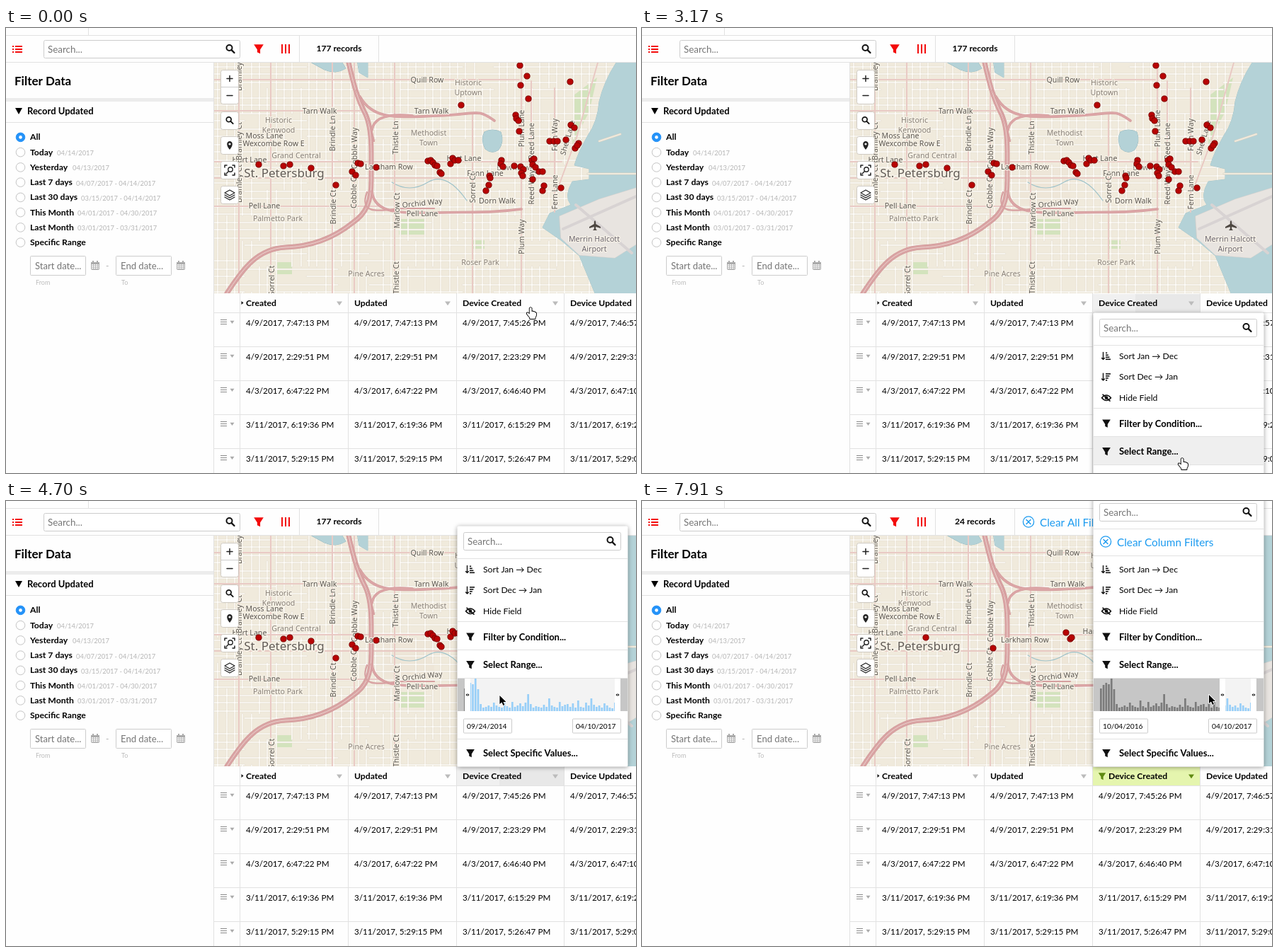
An HTML page with a canvas that plays this animation: 890 px wide and 629 px high, repeating every 8 s.

```html
<!DOCTYPE html>
<html lang="en">
<head>
<meta charset="utf-8">
<title>Filter by range</title>
<style>
html, body { margin: 0; width: 100%; height: 100%; overflow: hidden; background: #fff; }
canvas { display: block; }
</style>
</head>
<body>
<canvas id="stage" width="890" height="629"></canvas>
<script>
const stage = document.getElementById('stage').getContext('2d');
let g = stage;

// ---------- helpers ----------
const UI = 'Lato, sans-serif', MAP = '"Noto Sans", sans-serif';
const BLUE = '#1c9bf0', RED = '#f30b0b', LINE = '#e2e2e2';

function text(s, x, y, size = 11.7, color = '#000', weight = 400, family = UI, align = 'left') {
  g.font = `${weight} ${size}px ${family}`;
  g.fillStyle = color;
  g.textAlign = align;
  g.fillText(s, x, Math.round(y + size * .36));
}
const bold = (s, x, y, size = 12.2, color = '#000') => text(s, x, y, size, color, 700);
function rect(x, y, w, h, color) { g.fillStyle = color; g.fillRect(x, y, w, h); }
function box(x, y, w, h, r, fill, stroke) {
  g.beginPath();
  g.roundRect(x + .5, y + .5, w, h, r);
  g.fillStyle = fill; g.fill();
  if (stroke) { g.lineWidth = 1; g.strokeStyle = stroke; g.stroke(); }
}
function shape(d, x, y, fill, stroke, width = 1) {
  const path = new Path2D(d);
  g.save();
  g.translate(x, y);
  g.lineWidth = width;
  g.lineJoin = g.lineCap = 'round';
  if (stroke) { g.strokeStyle = stroke; g.stroke(path); }
  if (fill) { g.fillStyle = fill; g.fill(path); }
  g.restore();
}
function disc(x, y, r, fill, stroke, width = 1) {
  g.beginPath();
  g.arc(x, y, r, 0, 7);
  if (fill) { g.fillStyle = fill; g.fill(); }
  if (stroke) { g.lineWidth = width; g.strokeStyle = stroke; g.stroke(); }
}
function magnifier(x, y, size = 1) {
  disc(x - 1.5 * size, y - 1.5 * size, 4 * size, null, '#111', 2 * size);
  shape(`M${1.6 * size} ${1.6 * size}L${5.5 * size} ${5.5 * size}`, x, y, null, '#111', 2.3 * size);
}
const funnel = (x, y, color, s = 1) =>
  shape(`M${-6.5 * s} ${-6 * s}H${6.5 * s}L${2 * s} ${s}V${6.5 * s}L${-2 * s} ${4.5 * s}V${s}Z`, x, y, color);
const caret = (x, y, color, s = 4) => shape(`M${-s} ${-s * .6}H${s}L0 ${s * .8}Z`, x, y, color);
function clearIcon(x, y) {
  disc(x, y, 7.6, null, BLUE, 1.3);
  shape('M-3 -3L3 3M3 -3L-3 3', x, y, null, BLUE, 1.5);
}
function searchBox(x, y, w, h) {
  box(x, y, w, h, 2, '#fff', '#ccc');
  text('Search...', x + 6, y + h / 2 + .5, 13.4, '#757575');
  magnifier(x + w - 13, y + h / 2);
}

// ---------- map ----------
function road(d, width, color = '#dca5a6', casing = '#d09a9a') {
  shape(d, 0, 0, null, casing, width + 1);
  shape(d, 0, 0, null, color, width);
}
function label(s, x, y, angle = 0, color = '#5b5650', size = 10.6) {
  g.save();
  g.translate(x, y);
  g.rotate(angle * Math.PI / 180);
  g.font = `400 ${size}px ${MAP}`;
  g.textAlign = 'center';
  g.lineJoin = 'round';
  g.lineWidth = size > 15 ? 4 : 2.5;
  g.strokeStyle = '#f6f1e6';
  g.strokeText(s, 0, Math.round(size * .36));
  text(s, 0, 0, size, color, 400, MAP, 'center');
  g.restore();
}
function drawMap() {
  let seed = 11;
  const random = () => (seed = seed * 16807 % 2147483647) / 2147483647;
  rect(293, 49, 597, 326, '#f0eadc');

  // parks and pale districts
  rect(535, 195, 70, 55, '#eee6d8');
  shape('M383 331H404V348H383ZM555 270H592V292H555ZM660 300H676V312H660ZM802 95L835 70L824 118L800 165Z', 0, 0, '#d3e3bd');

  // small streets
  let streets = '';
  for (let x = 299, n = 0; x < 850; x += n++ % 3 ? 11 : 13)
    for (let y = 49; y < 375; y += 36)
      if (random() < .82) streets += `M${x} ${y}V${y + 36}`;
  for (let y = 55, n = 0; y < 375; y += n++ % 2 ? 12 : 10)
    for (let x = 293; x < 840; x += 44)
      if (random() < .85) streets += `M${x} ${y}H${x + 44}`;
  road(streets, 1.5, '#fffefa', '#ddd5c7');

  // bay, lakes and airfield
  const water = '#b4d2d7', shore = '#a3c4ca';
  shape('M890 49H862Q845 75 838 104Q836 132 822 152Q808 176 803 194L824 199V214L800 217Q788 238 798 250L768 262L758 282L784 300L810 322L832 375H890Z', 0, 0, water, shore);
  shape('M676 147Q687 141 699 147Q704 161 696 172Q687 179 677 171Q670 157 676 147ZM432 49H475L480 57Q466 66 450 59Z', 0, 0, water, '#8fb5bd');
  shape('M497 49H511V70L499 63Z', 0, 0, water, shore);
  shape('M782 266L838 242L890 226V306L860 325L810 321L784 297Z', 0, 0, '#e8e4e0', '#d3cecb');
  road('M787 284L890 238M805 250L884 318', 3, '#d8d3d3', '#d8d3d3');
  road('M822 206H890M838 160L868 150', 2, '#f0eadc', '#d5cfc2');
  shape('M545 218Q570 234 596 218T651 244', 0, 0, null, '#9fc3ca', 1.2);

  // main roads
  road('M293 73H725M293 117H500M293 189H785M293 212H780M293 252H530M329 49V375M374 49V375M461 49V375M492 49V375M549 49V375M659 120V375M728 49V375M742 75V250M775 85V260M836 49L806 155L782 220', 1, '#e9c5c1', '#e9cfc8');
  const motorway = 'M484 49C490 75 496 100 508 122Q516 140 516 175V215C516 246 509 262 490 275C458 301 425 309 395 310C355 312 335 340 312 375';
  road(motorway, 6, '#d9a3a3');
  shape(motorway, 0, 0, null, '#ecd3cf', 1);
  road('M500 97C519 131 553 126 610 124S665 113 690 131M517 144C520 124 545 121 574 124M517 231C520 263 557 262 610 261S690 261 728 256', 2.6);
  road('M510 232C496 270 540 255 565 255H605M495 88Q510 115 520 160', 1.2);

  // labels
  const soft = '#888078';
  for (const [s, x, y] of [['Historic', 385, 130], ['Kenwood', 385, 144], ['Historic', 653, 77], ['Uptown', 653, 91],
    ['Methodist', 597, 148], ['Town', 597, 162], ['Grand Central', 410, 180], ['Palmetto Park', 384, 269],
    ['Pine Acres', 509, 347], ['Roser Park', 670, 331], ['Downtown', 720, 197]]) label(s, x, y, 0, soft);
  for (const [s, x, y, a] of [['Quill Row', 595, 73], ['Tarn Walk', 443, 117], ['Tarn Walk', 601, 117],
    ['Moss Lane', 365, 152], ['Wexcombe Row E', 378, 163], ['Larkham Row', 541, 196], ['Hart Lane', 344, 186],
    ['Hart Lane', 647, 184], ['Fenn Lane', 677, 205], ['Dorn Walk', 694, 244], ['Pell Lane', 365, 251],
    ['Pell Lane', 588, 262], ['Orchid Way', 588, 247, -6], ['Brindle Ln', 461, 149, -90],
    ['Cobble Way', 492, 170, -90], ['Thistle Ln', 550, 155, -90], ['Brindle Ct', 462, 253, -90],
    ['Cobble Ct', 491, 231, -90], ['Marlow Ct', 552, 258, -90], ['Thistle Ct', 551, 353, -90],
    ['Sorrel Ct', 375, 357, -90], ['Sorrel Ct', 659, 226, -90], ['Plum Lane', 728, 142, -90],
    ['Reed Lane', 742, 160, -90], ['Reed Way', 742, 225, -90], ['Plum Way', 728, 295, -90],
    ['Fern Way', 775, 151, -90], ['Fern Lane', 775, 232, -90], ['Shell Lane', 793, 155, -74],
    ['Bramley Ct', 329, 62, -90], ['Bramley Ct', 329, 160, -90], ['Bramley Ct', 329, 220, -90]]) label(s, x, y, a);
  label('St. Petersburg', 393, 205, 0, '#625c57', 17);
  label('Merrin Halcott', 831, 298, 0, '#6b6570');
  label('Airport', 831, 312, 0, '#6b6570');
  shape('M0 -7Q1.5 -6 1.2 -2L8 2V4L1.2 2V5L3 7H-3L-1.2 5V2L-8 4V2L-1.2 -2Q-1.5 -6 0 -7Z', 832, 279, '#4d4741');
}

const dots = [357,193, 392,195, 401,193, 431,198, 466,222, 489,203, 494,208, 497,191, 501,192, 523,197,
  596,188, 600,187, 603,190, 606,194, 609,195, 613,204, 615,206, 628,192, 631,184, 634,187, 639,187, 643,109,
  726,53, 736,68, 727,81, 738,100, 797,76, 720,123, 721,128, 724,131, 725,146, 798,137, 803,141, 768,160,
  774,160, 779,160, 791,158, 804,170, 809,163, 807,166, 700,187, 699,192, 702,196, 683,209, 684,212, 682,222,
  678,230, 718,195, 727,196, 731,200, 728,205, 730,209, 743,187, 746,185, 744,193, 748,197, 753,203, 758,203,
  744,214, 760,223, 758,230, 784,226];
function drawDots(list) {
  for (let i = 0; i < list.length; i += 2) disc(list[i], list[i + 1], 4.1, '#b80404', '#7c0303');
}
function mapControls() {
  for (const [y, h] of [[59, 48], [118, 25], [153, 25], [188, 25], [223, 25]]) box(303, y, 25, h, 3, '#fff', '#cfcac2');
  rect(304, 83, 24, 1, '#ccc');
  shape('M-4 0H4M0 -4V4M-4 24H4', 316, 71.5, null, '#222', 1.5);
  magnifier(316, 130.5, .85);
  shape('M0 6C-6 -1 -4 -6 0 -6S6 -1 0 6Z', 316, 166, '#222');
  disc(316, 164, 1.6, '#fff');
  shape('M-7 -4V-7H-4M4 -7H7V-4M-7 4V7H-4M4 7H7V4M-5 5L-2 2', 316, 201, null, '#222', 1.5);
  disc(317, 200, 3.2, null, '#222', 1.4);
  shape('M-7 -3L0 -7L7 -3L0 1ZM-7 0L0 4L7 0M-7 3L0 7L7 3', 316, 236, null, '#222', 1.2);
}

// ---------- page ----------
function drawPage() {
  rect(0, 0, 890, 629, '#fefefe');
  rect(0, 10, 890, 1, LINE);
  rect(116, 0, 1, 10, LINE);
  rect(0, 48, 890, 1, LINE);
  for (const y of [25, 29, 33]) { rect(9, y, 2, 2, RED); rect(13, y, 10, 2, RED); }
  searchBox(53, 17, 277, 25);
  funnel(357, 29.5, RED, 1.05);
  for (const x of [389, 394, 399]) rect(x, 23, 2, 13, RED);
  rect(414, 11, 1, 37, LINE);
  rect(526, 11, 1, 37, LINE);

  bold('Filter Data', 12, 75, 17);
  rect(0, 99, 293, 5, '#ececec');
  shape('M-5 -4H5L0 5Z', 18, 117, '#000');
  bold('Record Updated', 30, 117, 13);
  rect(0, 133, 293, 1, LINE);
  [['All'], ['Today', '04/14/2017', 72], ['Yesterday', '04/13/2017', 94],
    ['Last 7 days', '04/07/2017 - 04/14/2017', 99], ['Last 30 days', '03/15/2017 - 04/14/2017', 106],
    ['This Month', '04/01/2017 - 04/30/2017', 101], ['Last Month', '03/01/2017 - 03/31/2017', 101], ['Specific Range']]
    .forEach(([name, dates, x], i) => {
      const y = 154.4 + i * 21.25;
      disc(20.5, y, 6.3, i ? '#fff' : '#2492f8', i ? '#c4c4c4' : '#2492f8');
      if (!i) disc(20.5, y, 2.3, '#fff');
      bold(name, 34, y - .4);
      if (dates) text(dates, x, y + 1, 9.4, '#b5b5b5');
    });
  [[34, 'Start date...', 'From'], [155, 'End date...', 'To']].forEach(([x, hint, note]) => {
    box(x, 322, 78, 27, 1, '#fff', '#ccc');
    text(hint, x + 7, 336.5, 13.1, '#757575');
    text(note, x + 8, 360, 9, '#bbb');
    box(x + 86, 331, 11, 10, 1, '#fff', '#aaa');
    rect(x + 86, 331, 12, 3, '#aaa');
    rect(x + 88, 329, 2, 3, '#aaa');
    rect(x + 94, 329, 2, 3, '#aaa');
    for (let i = 1; i < 4; i++) { rect(x + 86 + i * 3, 334, 1, 7, '#bbb'); rect(x + 86, 333 + i * 2.4, 12, 1, '#bbb'); }
  });
  text('-', 141, 336, 12, '#aaa');

  // table
  const columns = [331, 484, 637, 789];
  const left = ['4/9/2017, 7:47:13 PM', '4/9/2017, 2:29:51 PM', '4/3/2017, 6:47:22 PM', '3/11/2017, 6:19:36 PM', '3/11/2017, 5:29:15 PM'];
  const right = [['4/9/2017, 7:45:26 PM', '4/9/2017, 7:46:57 PM'], ['4/9/2017, 2:23:29 PM', '4/9/2017, 2:29:31 PM'],
    ['4/3/2017, 6:46:40 PM', '4/3/2017, 6:47:10 PM'], ['3/11/2017, 6:15:29 PM', '3/11/2017, 6:19:21 PM'],
    ['3/11/2017, 5:26:47 PM', '3/11/2017, 5:29:01 PM']];
  rect(293, 49, 1, 580, LINE);
  for (const x of columns) rect(x - 1, 375, 1, 254, LINE);
  ['Created', 'Updated', '', 'Device Updated'].forEach((s, i) => {
    bold(s, columns[i] + 8, 389);
    if (i < 2) caret(columns[i] + 140, 389, '#bbb');
  });
  shape('M0 -2.5L3 0L0 2.5Z', 332.5, 388.5, '#111');
  left.forEach((created, i) => {
    const y = 416.5 + i * 48;
    rect(294, y - 14.5, 596, 1, LINE);
    for (const dy of [-4.5, -1.5, 1.5]) rect(303, y + dy, 9, 1, '#888');
    caret(319.5, y - 1, '#aaa', 3);
    [created, created, ...right[i]].forEach((s, c) => text(s, columns[c] + 8, y));
  });

  g.save();
  g.beginPath();
  g.rect(294, 49, 596, 326);
  g.clip();
  drawMap();
  g.restore();
}

// ---------- timed parts ----------
const OPEN = 1760, FLIP = 3290, EXPAND = 3530, DRAG = 5400, APPLY = 6790, COUNT = 6970, LEAVE = 7910, STEP = 114;
const bars = [32,37,40,38,46,31,10,5,6,8,6,12,8,6,5,15,7,5,13,6,8,11,7,12,24,10,5,7,6,5,
  9,6,18,8,6,5,13,7,9,10,6,11,5,15,6,5,12,8,18,9,6,8,5,11,8,5,4,12];
// pointer x, left edge of the range, days after the first date
const dragSteps = [[680, 651, 13], [745, 700, 222], [800, 750, 436], [812, 790, 621], [818, 808, 704], [820, 815, 736], [820, 816, 741]];
// start, steps, x, y
const moves = [[470, 1, 742, 397], [620, 2, 775, 384], [2120, 7, 763, 608], [3640, 6, 772, 275], [4350, 7, 649, 275], [5160, 1, 650, 276]];

const dragAt = t => t < DRAG ? [650, 648, 0] : dragSteps[Math.min(6, Math.floor((t - DRAG) / STEP))];

function pointerAt(t) {
  if (t >= LEAVE) return [801, 274];
  if (t >= DRAG) return [dragAt(t)[0], 277];
  let x = 741, y = 395;
  for (const [start, steps, toX, toY] of moves) {
    if (t < start) break;
    const k = Math.min(1, (Math.floor((t - start) / STEP) + 1) / steps), e = k * k * (3 - 2 * k);
    x += (toX - x) * e + (start === 2120 ? 10 * Math.sin(Math.PI * k) : 0);
    y += (toY - y) * e;
  }
  return [x, y];
}
function drawPointer(t) {
  const [x, y] = pointerAt(t);
  if (t < FLIP)
    shape('M-1.3 1.2Q.2 -1 1.6 1.2V6Q3 5 4 6.2Q5.5 5.4 6.2 7Q7.8 6.6 8 8.6V11Q7.6 13 6.5 14.2V16H-.8V14.5Q-3 12 -5.2 9Q-5.6 6.8 -3.4 7.6L-1.3 9.6ZM2 12V14M4 12V14', x, y, '#fff', '#000', 1.8);
  else if (y > 375)
    shape('M-2.5 -7Q0 -7 0 -5Q0 -7 2.5 -7M0 -5V5M-2.5 7Q0 7 0 5Q0 7 2.5 7M-1.5 2H1.5', x, y - 2, null, '#111', 1.1);
  else if (t >= 5050 && t < LEAVE)
    shape('M-7 0L-3 -4V-1H3V-4L7 0L3 4V1H-3V4Z', x, y, '#000', '#fff', 1.6);
  else
    shape('M0 0V12L3 9.5L5 14L7 13L5 9H9Z', x, y, '#000', '#fff', 1.8);
}

function histogram(t, y) {
  const edge = dragAt(t)[1], bottom = y + 46;
  rect(638, y, 240, 46, '#f3f3f3');
  rect(638, y, edge - 638, 46, '#c6c6c6');
  rect(868, y, 10, 46, '#c6c6c6');
  bars.forEach((h, i) => {
    const x = 647 + i * 3.72;
    rect(x, bottom - h, 2.7, h, x < edge ? '#7b7b7b' : '#98cff8');
  });
  for (const x of [edge, 860]) {
    rect(x, y, 8, 46, '#fff');
    shape('M-2.5 0L-.5 -2V2ZM2.5 0L.5 -2V2Z', x + 4, y + 23, '#111');
  }
}

function drawPopup(t) {
  const open = t >= FLIP, full = t >= EXPAND, filtered = t >= APPLY;
  const top = open ? (full ? 35 : 82) : 402, lift = filtered ? 41 : 0;
  g.save();
  g.shadowColor = 'rgba(0,0,0,.4)';
  g.shadowBlur = 6;
  g.shadowOffsetY = 1;
  box(637, top - lift, 241, (open ? 375 : 660) - top + lift, 2, '#fff');
  g.restore();
  const divider = y => rect(638, y, 240, 1, LINE);

  searchBox(646, top + 9 - lift, 222, 25);
  if (t < 2300) rect(652, top + 15, 1, 16, '#111');
  if (filtered) {
    divider(39);
    clearIcon(655, 57.5);
    text('Clear Column Filters', 671, 58, 15.3, BLUE);
  }
  divider(filtered ? 77 : top + 46);
  ['Sort Jan → Dec', 'Sort Dec → Jan', 'Hide Field'].forEach((s, i) => {
    const y = top + 61.5 + i * 29.6;
    text(s, 674, y, 12.2);
    if (i === 2) {
      shape('M-6.5 0Q0 -7.5 6.5 0Q0 7.5 -6.5 0Z', 656, y, null, '#111', 1.6);
      disc(656, y, 2.4, '#111');
      shape('M-5 -4.5L5 4.5', 656, y, null, '#111', 1.6);
    } else {
      shape('M-3.5 -5V5M-5.5 3L-3.5 5L-1.5 3', 655, y, null, '#111', 1.4);
      for (let k = 0; k < 4; k++) rect(655, y - 5 + k * 3, i ? 7 - k * 1.6 : 2.2 + k * 1.6, 1.6, '#111');
    }
  });
  divider(top + 135);
  funnel(656, top + 157, '#111', .9);
  bold('Filter by Condition...', 674, top + 157, 13);
  if (!open && t >= 2940) rect(638, top + 176, 240, 39, '#efefef');
  divider(top + 175);
  funnel(656, top + 196.5, '#111', .9);
  bold('Select Range...', 674, top + 196.5, 13);
  divider(top + 215);
  if (!open) return;

  if (full) histogram(t, 251);
  const from = new Date(2014, 8, 24 + dragAt(t)[2])
    .toLocaleDateString('en-US', { year: 'numeric', month: '2-digit', day: '2-digit' });
  [[646, from], [800, '04/10/2017']].forEach(([x, s]) => {
    box(x, 307.5, 68, 20, 1, '#fff', '#ccc');
    text(s, x + 5, 318.5, 10.2);
  });
  divider(336);
  funnel(656, 356.5, '#111', .9);
  bold('Select Specific Values...', 674, 356.5, 13);
}

function drawHeader(t) {
  const filtered = t >= APPLY;
  if (filtered) rect(637, 376, 151, 26, '#e5f5ae');
  else if (t >= OPEN) { rect(637, 376, 60, 26, '#f0f0f0'); rect(697, 376, 91, 26, '#e8e8e8'); }
  if (filtered) funnel(650, 389, '#5f8a12', .8);
  bold('Device Created', filtered ? 659 : 645, 389);
  caret(776, 389, filtered ? '#5f8a12' : '#bbb');
}

const backdrop = document.createElement('canvas');
backdrop.width = 890;
backdrop.height = 629;
g = backdrop.getContext('2d');
drawPage();
g = stage;

function draw(now) {
  const t = now % 8000;
  g.drawImage(backdrop, 0, 0);
  g.save();
  g.beginPath();
  g.rect(294, 49, 596, 326);
  g.clip();
  if (t < APPLY) drawDots(dots);
  if (t >= 7200) drawDots([401, 193, 496, 208]);
  if (t >= 7320) drawDots([599, 186, 605, 195, 607, 193]);
  mapControls();
  g.restore();
  text(t < COUNT ? '177 records' : '24 records', 470.5, 29, 12.1, '#000', 700, UI, 'center');
  if (t >= APPLY) {
    clearIcon(546, 29.5);
    text('Clear All Filters', 562, 30, 15.3, BLUE);
  }
  drawHeader(t);
  if (t >= OPEN) drawPopup(t);
  drawPointer(t);
}

const start = performance.now();
function tick() {
  draw(performance.now() - start);
  requestAnimationFrame(tick);
}
tick();
</script>
</body>
</html>
```
